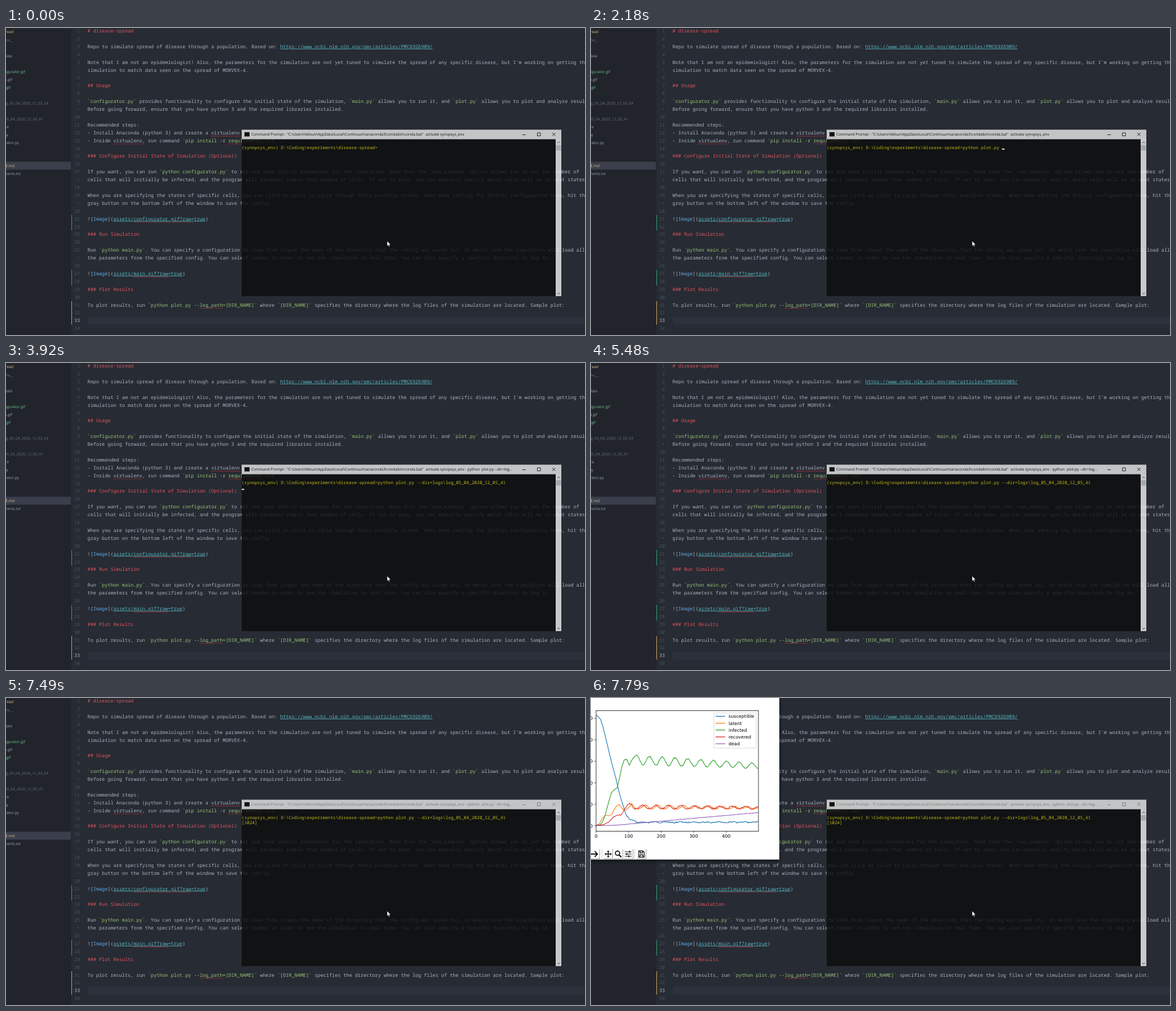
These frames come from a looping animation (1027x545 px, 8000 ms). An HTML page:

```html
<!DOCTYPE html>
<html lang="en">
<head>
<meta charset="utf-8">
<title>Plotting a simulation log</title>
<style>
  html, body { margin: 0; width: 100%; height: 100%; overflow: hidden; background: #272b33; }
  svg { display: block; width: 100%; height: 100%; }
  text { white-space: pre; text-rendering: geometricPrecision; }
  .code { font: 8.5px "Noto Sans Mono", monospace; }
  .ui { font: 6.7px "Open Sans", sans-serif; }
  .term { font: 7.73px "Noto Sans Mono", monospace; }
  .plot { font: 8px "DejaVu Sans", sans-serif; }
  .link { text-decoration: underline; }
</style>
</head>
<body>
<svg id="stage" viewBox="0 0 1027 545" preserveAspectRatio="none">
  <defs>
    <filter id="shadow" x="-10%" y="-10%" width="125%" height="125%">
      <feDropShadow dx="1" dy="3" stdDeviation="3" flood-opacity=".5"/>
    </filter>
  </defs>

  <rect width="1027" height="545" fill="#272b33"/>
  <rect x="145" y="513" width="882" height="13.5" fill="#2c313c"/>
  <g id="editor"></g>
  <g id="sidebar">
    <rect width="116" height="545" fill="#21252b"/>
    <rect y="237.5" width="115" height="14" fill="#3a3f4b"/>
    <path d="M116.5 332v27.5M116.5 429.500v27.5" stroke="#2fa673"/>
    <path d="M116.500 485v41.500" stroke="#d0a860"/>
  </g>

  <g id="terminal">
    <rect x="418" y="197" width="557" height="279" fill="#0c0c0c" fill-opacity=".8"/>
    <rect x="975" y="197" width="10" height="279" fill="#f0f0f0" fill-opacity=".8"/>
    <rect x="975.5" y="208" width="9" height="9.500" fill="#a6a8aa"/>
    <path d="M978 204.300l2.300-2.300 2.300 2.300M978 470l2.300 2.300 2.300-2.300" fill="none" stroke="#444"/>
    <rect x="418" y="180.500" width="567" height="17" fill="#c3c4c5"/>
    <rect x="423" y="185" width="9" height="7.500" fill="#111"/>
    <g id="caption" fill="#111">
      <path d="M916 189.500h6M942.500 186h5.500v5.500h-5.500zM969 186l5.500 5.500M974.500 186l-5.500 5.500" fill="none" stroke="currentColor" stroke-width=".9"/>
    </g>
    <rect id="caret" width="4.64" height="2.200" fill="#ccc"/>
  </g>

  <g id="figure" class="plot">
    <rect id="paper" x="-20" y="-20" width="354" height="306.700" fill="#fff"/>
    <g id="axes" fill="none" stroke="#000" stroke-width=".7"></g>
    <g id="curves" fill="none" stroke-width="1.150" stroke-linejoin="round"></g>
    <rect x="9" y="22.500" width="288" height="214" fill="none" stroke="#000" stroke-width=".8"/>
    <rect x="218" y="26.500" width="75" height="62.500" rx="1.500" fill="#fff" fill-opacity=".8" stroke="#ccc" stroke-width=".8"/>
    <g id="legend" stroke-width="1.300"></g>
    <g fill="none" stroke="#888" stroke-width=".8">
      <path d="M0 285.500h15.500v-17M22 285.500h16.500v-17M40 285.500h16.500v-17M58 285.500h16.500v-17M81 285.500h16.500v-17"/>
      <path d="M19.500 268v18M77.500 268v18" stroke="#bbb"/>
    </g>
    <g fill="none" stroke="#111" stroke-width="1.800">
      <path d="M0 277h11M6.500 272l5 5-5 5"/>
      <path d="M25 277h11M30.500 271.500v11" stroke-width="1.400"/>
      <path d="M24 277l2.800-2.300v4.600zM37 277l-2.800-2.300v4.600zM30.500 270.500l-2.300 2.800h4.600zM30.500 283.500l-2.300-2.800h4.600z" fill="#111" stroke="none"/>
      <circle cx="47" cy="275.500" r="3.800"/>
      <path d="M49.800 278.500l4 4" stroke-width="2.300"/>
      <path d="M60 273h12M60 277h12M60 281h12" stroke-width="1.200"/>
      <path d="M68.500 271.300v3.400M63.500 275.300v3.400M67 279.300v3.400"/>
      <path d="M84.500 271.500h7.500l2.500 2.500v8.500h-10zM87 271.500v3.500h4.500v-3.500M86.700 282.500v-4h5.600v4" stroke-width="1.300"/>
    </g>
  </g>

  <path d="M676 378v9.300l2.100-2 1.400 3.200 1.400-.6-1.400-3.100h2.900z" fill="#fff" stroke="#000" stroke-width=".5"/>
</svg>

<script>
const $ = id => document.getElementById(id);

function add(parent, tag, attrs, content = "") {
  const node = document.createElementNS("http://www.w3.org/2000/svg", tag);
  for (const key in attrs) node.setAttribute(key, attrs[key]);
  node.textContent = content;
  return parent.appendChild(node);
}

// ---------- Editor ----------
const COL = 5.1, ROW = 13.9, LEFT = 144.6;
const TEXT = "#abb2bf", GREEN = "#98c379", RED = "#e2555f";
const rowY = row => 8 + ROW * row;

// A leading "~" marks the wrapped continuation of the line above.
const lines = `# disease-spread

Repo to simulate spread of disease through a population. Based on: https://www.ncbi.nlm.nih.gov/pmc/articles/PMC6926909/

Note that I am not an epidemiologist! Also, the parameters for the simulation are not yet tuned to simulate the spread of any specific disease, but I'm working on getting the
~simulation to match data seen on the spread of MORVEX-4.

## Usage

'configurator.py' provides functionality to configure the initial state of the simulation, 'main.py' allows you to run it, and 'plot.py' allows you to plot and analyze results.
~Before going forward, ensure that you have python 3 and the required libraries installed.

Recommended steps:
- Install Anaconda (python 3) and create a virtualenv
- Inside virtualenv, run command 'pip install -r requirements.txt'

### Configure Initial State of Simulation (Optional)

If you want, you can run 'python configurator.py' to set and save initial parameters for the simulation. Note that the "num_samples" option allows you to set the number of
~cells that will initially be infected, and the program will randomly sample that number of cells. If set to zero, you can manually specify which cells will be in what states.

When you are specifying the states of specific cells, you can click on cells to cycle through their possible states. When done setting the initial configuration here, hit the
~gray button on the bottom left of the window to save the config.

![Image](assets/configurator.gif?raw=true)

### Run Simulation

Run 'python main.py'. You can specify a configuration to load from (input the name of the directory that the config was saved to), in which case the simulation will load all
~the parameters from the specified config. You can select render in order to see the simulation in real time. You can also specify a specific directory to log to.

![Image](assets/main.gif?raw=true)

### Plot Results

To plot results, run 'python plot.py --log_path=[DIR_NAME]' where '[DIR_NAME]' specifies the directory where the log files of the simulation are located. Sample plot:


`.split("\n");

const tokens = /('[a-z[][^']*'|https\S+|Image|assets[^)]*)/;

function tokenStyle(token, heading) {
  if (heading) return { fill: RED };
  if (/^'[a-z[].*'$/.test(token)) return { fill: GREEN };
  if (/^(https|assets)/.test(token)) return { fill: "#56b6c2", class: "code link" };
  return { fill: token === "Image" ? "#61afef" : TEXT };
}

let number = 0;
lines.forEach((line, row) => {
  const wrapped = line[0] === "~";
  if (!wrapped) number++;
  add($("editor"), "text", {
    class: "code", x: wrapped ? 130.5 : 131.2, y: rowY(row), "text-anchor": "end",
    fill: number === 33 ? TEXT : "#495162"
  }, wrapped ? "•" : number);

  const body = wrapped ? line.slice(1) : line;
  const heading = body[0] === "#";
  let col = 0;
  for (const part of heading ? [body] : body.split(number === 5 ? /(?!)/ : tokens)) {
    if (!part) continue;
    const shown = number === 5 ? part : part.replace(/'/g, "`").replace(/"/g, "'");
    add($("editor"), "text", {
      class: "code", x: LEFT + col * COL, y: rowY(row), ...tokenStyle(part, heading)
    }, shown);
    col += part.length;
  }
});

// Spell-check marks: row, column, length
for (const [row, col, length] of [[13, 43, 10], [14, 9, 10], [14, 49, 12], [24, 16, 20], [31, 16, 12], [35, 39, 8]])
  add($("editor"), "path", {
    d: `M${LEFT + col * COL} ${rowY(row) + 3.2}h${length * COL}`,
    stroke: "#d0343c", "stroke-width": 1.1, "stroke-dasharray": "1.3 1.2"
  });

// ---------- Sidebar: name, right edge, centre, colour ----------
const PLAIN = "#9da5b4", DIM = "#69707d", ADDED = "#6fc28a", CHANGED = "#e2c08d";
for (const [name, right, y, fill] of [
  ["disease-spread", 13, 7, CHANGED], ["__pycache__", 13, 22, DIM], ["data", 11, 50, PLAIN],
  ["configurator.gif", 34, 78, ADDED], ["main.gif", 11, 92, PLAIN], ["plot.gif", 8, 106, ADDED],
  ["config_05_04_2020_12_03_54", 75, 134, DIM], ["log_05_04_2020_12_05_41", 66, 161.5, DIM],
  [".gitignore", 5, 176, PLAIN], ["cell.py", 4, 190, PLAIN], ["configurator.py", 23, 204, PLAIN],
  ["README.md", 15, 245, CHANGED], ["requirements.txt", 26, 259, PLAIN]
]) add($("sidebar"), "text", { class: "ui", x: right, y: y + 2.4, "text-anchor": "end", fill }, name);

// ---------- Terminal ----------
const CELL = 4.64;
const prompt = "(synopsys_env) D:\\Coding\\experiments\\disease-spread>";
const command = "python plot.py --dir=logs\\log_05_04_2020_12_05_41";
const caption = 'Command Prompt - "C:\\Users\\Velsun\\AppData\\Local\\Continuum\\anaconda3\\condabin\\conda.bat"  activate synopsys_env';
const terminalText = (y, content) =>
  add($("terminal"), "text", { class: "term", x: 418, y, fill: "#bdba1c" }, content);

const captionText = add($("caption"), "text", { class: "ui", x: 435, y: 191.4 });
terminalText(214.7, prompt);
const typed = terminalText(214.7, "");
typed.setAttribute("x", 418 + prompt.length * CELL);
const output = terminalText(224.2, "[1024]");

// ---------- Figure ----------
const tickX = t => 9 + 0.577 * t;
for (let i = 0; i < 6; i++) {
  const y = 36 + 38.2 * i;
  add($("axes"), "path", { d: `M6 ${y}h3` });
  add($("figure"), "text", { x: 3, y: y + 2.9, "text-anchor": "end" }, i < 5 ? `${5 - i}00` : "0");
}
for (let t = 0; t < 500; t += 100) {
  add($("axes"), "path", { d: `M${tickX(t)} 236.500v3` });
  add($("figure"), "text", { x: tickX(t), y: 248, "text-anchor": "middle" }, t);
}

let seed = 7;
const noise = () => (seed = (seed * 16807) % 2147483647) / 2147483647 - 0.5;

function through(points, x) {
  const i = Math.max(1, points.findIndex(p => p[0] >= x));
  const [[x0, y0], [x1, y1]] = [points[i - 1], points[i]];
  return y0 + (y1 - y0) * (x - x0) / (x1 - x0);
}

const wave = (x, peak) => -Math.cos((x - peak) * 2 * Math.PI / 22.7);
const series = [
  { name: "susceptible", color: "#1f77b4", jitter: 2,
    start: [[9, 31], [12, 32], [17, 38], [21, 50], [27, 75], [35, 108], [44, 142], [50, 168], [56, 188], [62, 207], [68, 215], [80, 219]],
    later: x => 220.5 + 0.7 * wave(x, 90) },
  { name: "latent", color: "#ff7f0e", jitter: 2,
    start: [[9, 226], [14, 224], [20, 214], [26, 208], [31, 209], [36, 207], [42, 196], [50, 188], [55, 196], [60, 200], [66, 195], [73, 188], [80, 197]],
    later: x => 193.5 + (x - 80) * 0.006 + 4 * wave(x, 96) * (1 - x / 600) },
  { name: "infected", color: "#2ca02c", jitter: 2,
    start: [[9, 226], [16, 225], [21, 219], [25, 208], [31, 186], [36, 169], [40, 164], [46, 160], [50, 145], [55, 121], [59, 109], [63, 109], [68, 119], [73, 109], [80, 101]],
    later: x => 110 + (x - 80) * 0.048 + (9.5 - x / 60) * wave(x, 81) },
  { name: "recovered", color: "#d62728", jitter: 2,
    start: [[9, 226], [22, 225], [32, 220], [40, 211], [48, 208], [54, 207], [60, 197], [66, 189], [70, 187], [75, 195], [80, 198]],
    later: x => 193.5 + (x - 80) * 0.006 + 4 * wave(x, 92) * (1 - x / 600) },
  { name: "dead", color: "#9467bd", jitter: 0.4,
    start: [[9, 226.5], [40, 226], [60, 224.5], [80, 222.5]],
    later: x => 222.5 - (x - 80) * 0.088 }
];

series.forEach(({ name, color, jitter, start, later }, i) => {
  const points = [];
  for (let t = 0; t < 500; t += 2) {
    const x = tickX(t);
    const y = x < 80 ? through(start, x) : later(x);
    const wobble = noise() * jitter * Math.min(1, Math.max(0, (x - 14) / 50));
    points.push(`${x.toFixed(1)},${(y + wobble).toFixed(1)}`);
  }
  add($("curves"), "polyline", { points: points.join(" "), stroke: color });
  const y = 32.5 + 12.2 * i;
  add($("legend"), "path", { d: `M221 ${y}h17`, stroke: color });
  add($("legend"), "text", { x: 244, y: y + 2.8, "stroke-width": 0 }, name);
});

// ---------- Timeline: time, characters typed, caret line (-1 = hidden) ----------
const END = command.length;
const steps = [
  [0, 0, -1], [250, 0, 0], [530, 1, 0], [650, 2, 0], [800, 4, 0], [920, 5, 0], [1070, 7, 0],
  [1220, 8, 0], [1340, 9, 0], [1620, 10, 0], [1740, 14, 0], [2180, 15, 0], [2300, 15, -1],
  [2420, 16, 0], [2540, 17, 0], [2690, 18, 0], [2810, 19, 0], [2930, 20, 0], [3210, 21, 0],
  [3330, 21, -1], [3920, END, 1], [4450, END, -1], [4890, END, 1], [5480, END, -1],
  [5910, END, 1], [6470, END, -1], [7090, END, 1], [7210, END, 2], [7490, END, -1]
];
const show = (node, visible) => node.setAttribute("visibility", visible ? "visible" : "hidden");

function draw(time) {
  const [, count, caretLine] = steps.findLast(step => step[0] <= time);
  const running = time >= 3920, blurred = time >= 7490, opened = time >= 7790;

  typed.textContent = command.slice(0, count);
  captionText.textContent = caption + (running ? " - python  plot.py --dir=log..." : "");
  $("caption").setAttribute("fill", blurred ? "#777" : "#111");
  $("caption").setAttribute("color", blurred ? "#777" : "#111");
  show(output, time >= 7210);

  show($("caret"), caretLine >= 0);
  $("caret").setAttribute("x", 418 + (caretLine ? 0 : (prompt.length + count) * CELL));
  $("caret").setAttribute("y", 213.9 + 9.4 * Math.max(0, caretLine));

  const figure = $("figure");
  figure.setAttribute("display", time >= 7640 ? "inline" : "none");
  figure.setAttribute("opacity", opened ? 1 : 0.78);
  figure.setAttribute("transform", opened ? "" : "translate(8 22) scale(.987) translate(-8 -22)");
  $("paper").setAttribute("filter", opened ? "url(#shadow)" : "none");
}

function tick() {
  draw(performance.now() % 8000);
  requestAnimationFrame(tick);
}
tick();
</script>
</body>
</html>
```
